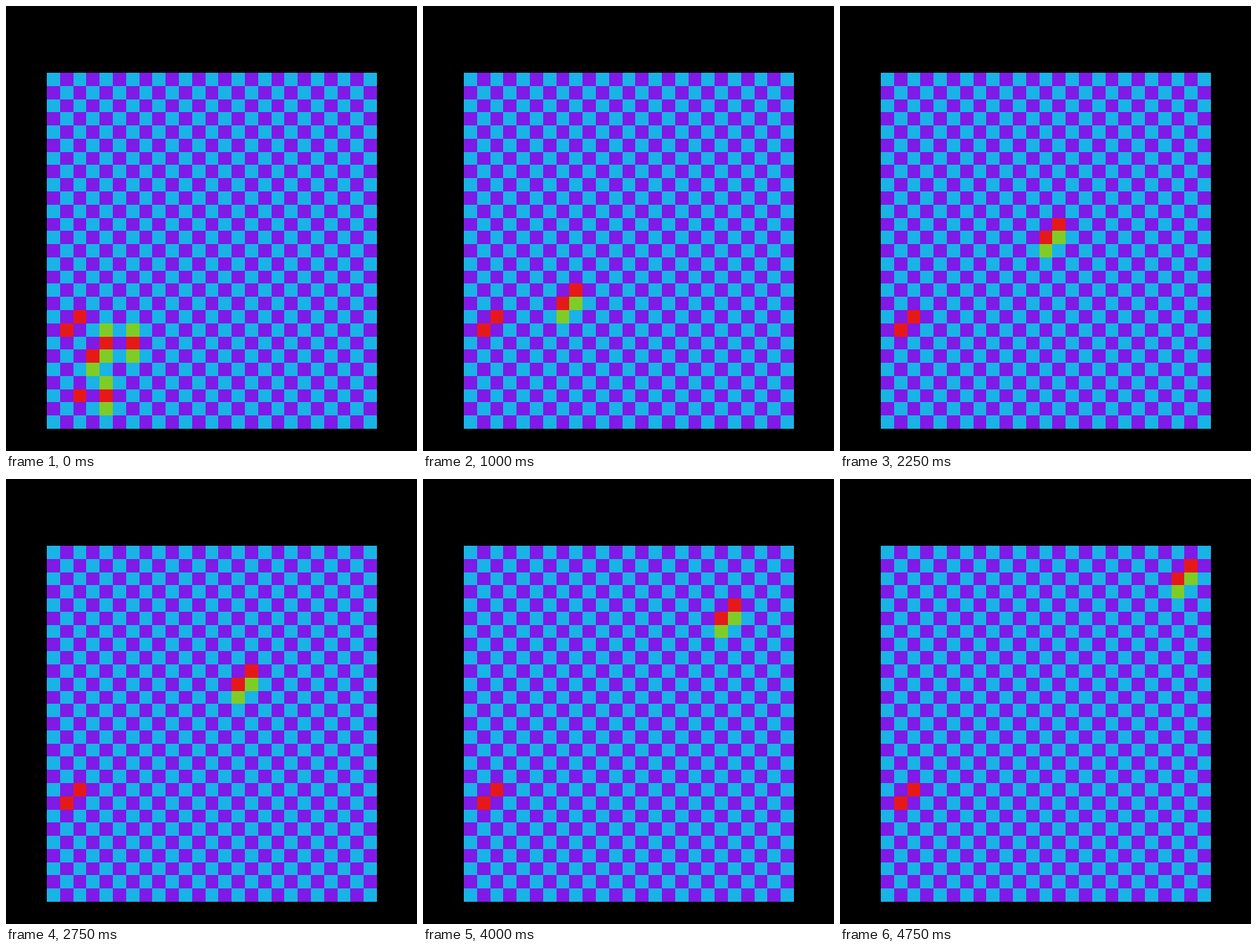
These frames come from a looping animation (554x600 px, 5 s). An HTML page with a canvas:

```html
<!DOCTYPE html>
<html lang="en">
<head>
<meta charset="utf-8">
<title>Checkerboard automaton</title>
<style>
  html, body { margin: 0; width: 100%; height: 100%; overflow: hidden; background: #000; }
  canvas { display: block; }
</style>
</head>
<body>
<canvas id="stage" width="554" height="600"></canvas>
<script>
const ctx = document.getElementById('stage').getContext('2d');
const COLS = 25, ROWS = 27, STEP = 250, STEPS = 20;
const board = { x: 55, y: 90, w: 445, h: 480 };

// Colours indexed by cell parity (column + row).
const RESTING = ['#19b3e6', '#801ae6'];
const LIVE = ['#e61919', '#80cc26'];

const fixedPair = [[2, 18], [1, 19]];
const glider = [[4, 20], [3, 21], [4, 21], [3, 22]];
// Short-lived cells around the glider, by step.
const debris = [
  [[4, 19], [6, 19], [6, 20], [6, 21], [4, 23], [2, 24], [4, 24], [4, 25]],
  [[3, 24]],
];

const edgeX = col => Math.round(board.x + col * board.w / COLS);
const edgeY = row => Math.round(board.y + row * board.h / ROWS);

function fillCell(col, row, palette) {
  const x = edgeX(col), y = edgeY(row);
  ctx.fillStyle = palette[(col + row) % 2];
  ctx.fillRect(x, y, edgeX(col + 1) - x, edgeY(row + 1) - y);
}

function draw(step) {
  ctx.fillStyle = '#000';
  ctx.fillRect(0, 0, 554, 600);
  for (let row = 0; row < ROWS; row++)
    for (let col = 0; col < COLS; col++) fillCell(col, row, RESTING);

  const moved = glider.map(([col, row]) => [col + step, row - step]);
  for (const [col, row] of [...fixedPair, ...moved, ...(debris[step] || [])])
    fillCell(col, row, LIVE);
}

const start = performance.now();
function tick() {
  draw(Math.floor((performance.now() - start) / STEP) % STEPS);
  requestAnimationFrame(tick);
}
tick();
</script>
</body>
</html>
```
